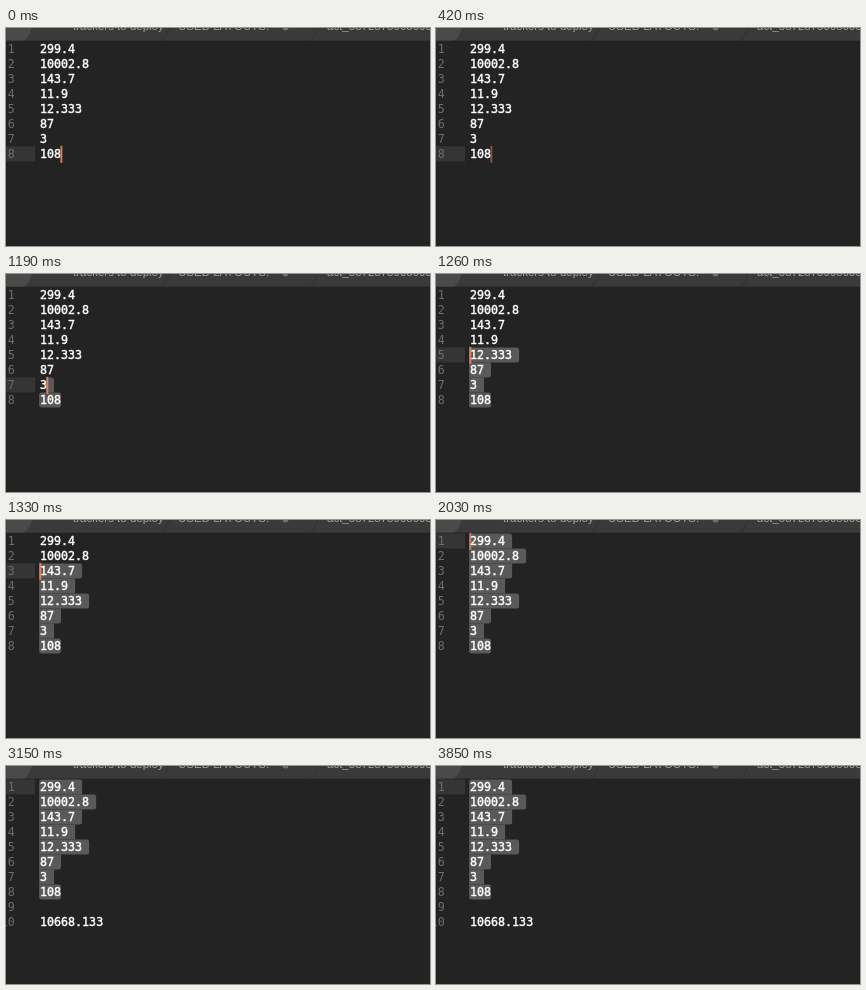
An HTML page with a canvas that plays this animation: 424 by 218 pixels, repeating every 4200 ms.

```html
<!DOCTYPE html>
<html lang="en">
<head>
<meta charset="utf-8">
<title>Summing selected lines</title>
<style>
  html, body { margin: 0; width: 100%; height: 100%; overflow: hidden; background: #232323; }
  canvas { display: block; }
</style>
</head>
<body>
<canvas id="stage" width="424" height="218"></canvas>
<script>
const ctx = document.getElementById('stage').getContext('2d');
const LOOP = 4200, TOP = 13.4, ROW = 15, LEFT = 34, CHAR = 7.02;
const MONO = '11.66px "DejaVu Sans Mono", monospace';
const SANS = '11.5px "Liberation Sans", Arial, sans-serif';
const numbers = ['299.4', '10002.8', '143.7', '11.9', '12.333', '87', '3', '108'];
const LAST = numbers.length - 1;

// [start time, caret row, caret column]
const caretMoves = [[0, 7, 3], [1190, 6, 1], [1260, 4, 0], [1330, 2, 0], [1400, 0, 0]];
// [start time, caret opacity]
const caretFade = [
  [0, .85], [140, 1], [420, .45], [490, 0], [910, 1], [1190, .85], [2030, .75], [2100, 0],
  [2240, 1], [2660, .7], [2730, .35], [2800, 0], [3290, .35], [3360, .7], [3430, 1],
  [3780, .45], [3850, 0]
];
const SUM_TIME = 2240;

const at = (steps, t) => steps.findLast(step => step[0] <= t);
const rowTop = row => TOP + row * ROW;

function text(string, x, y, font, color, align = 'left') {
  ctx.font = font;
  ctx.fillStyle = color;
  ctx.textAlign = align;
  ctx.fillText(string, x, y);
}

function drawTabs() {
  ctx.fillStyle = '#3a3a3a';
  ctx.fillRect(0, 0, 424, 12.6);

  ctx.fillStyle = '#4a4a4a';
  ctx.beginPath();
  ctx.moveTo(0, 0);
  ctx.lineTo(26, 0);
  ctx.bezierCurveTo(23, 7, 22, 11, 17, 12.6);
  ctx.lineTo(0, 12.6);
  ctx.fill();

  ctx.strokeStyle = '#303030';
  ctx.lineWidth = 1;
  for (const x of [163, 312]) {
    ctx.beginPath();
    ctx.moveTo(x, 0);
    ctx.bezierCurveTo(x - 3, 7, x - 4, 11, x - 9, 12.5);
    ctx.stroke();
  }

  text('trackers to deploy', 67, 2, SANS, '#a2a2a2');
  text('USED LAYOUTS:', 172, 2, SANS, '#a2a2a2');
  text('act_5872875908003', 321, 2, SANS, '#a2a2a2');
  ctx.fillStyle = '#707070';
  ctx.beginPath();
  ctx.arc(279.5, -.5, 3, 0, Math.PI * 2);
  ctx.fill();
}

function drawSelection(firstRow, column) {
  // Every selected row but the last includes its line break.
  const end = row => row < firstRow || row > LAST ? 0
    : LEFT + CHAR * (numbers[row].length + (row < LAST ? 1 : 0));
  ctx.fillStyle = '#595959';
  for (let row = firstRow; row <= LAST; row++) {
    const x = LEFT - .9 + (row === firstRow ? column * CHAR : 0);
    const right = end(row);
    const startsLeft = row === firstRow || (row === firstRow + 1 && column > 0);
    ctx.beginPath();
    ctx.roundRect(x, rowTop(row), right - x, ROW, [
      startsLeft ? 2.5 : 0,
      right > end(row - 1) ? 2.5 : 0,
      right > end(row + 1) ? 2.5 : 0,
      row === LAST ? 2.5 : 0
    ]);
    ctx.fill();
  }
}

function draw(t) {
  const [, row, column] = at(caretMoves, t);
  const lines = t < SUM_TIME ? numbers : [...numbers, '', '10668.133'];

  ctx.fillStyle = '#232323';
  ctx.fillRect(0, 0, 424, 218);
  drawTabs();

  ctx.fillStyle = '#353535';
  ctx.fillRect(0, rowTop(row), 29, ROW);
  if (row < LAST) drawSelection(row, column);

  lines.forEach((line, i) => {
    const baseline = rowTop(i) + 11.6;
    text(i + 1, 8.7, baseline, MONO, '#6c6c6c', 'right');
    text(line, LEFT, baseline, MONO, '#fff');
    ctx.strokeStyle = '#fff';
    ctx.lineWidth = .4;
    ctx.strokeText(line, LEFT, baseline);
  });

  ctx.globalAlpha = at(caretFade, t)[1];
  ctx.fillStyle = '#f88a62';
  ctx.fillRect(LEFT - .7 + column * CHAR, rowTop(row) - .6, 2, 17);
  ctx.globalAlpha = 1;
}

const start = performance.now();
function frame() {
  draw((performance.now() - start) % LOOP);
  requestAnimationFrame(frame);
}
frame();
</script>
</body>
</html>
```
